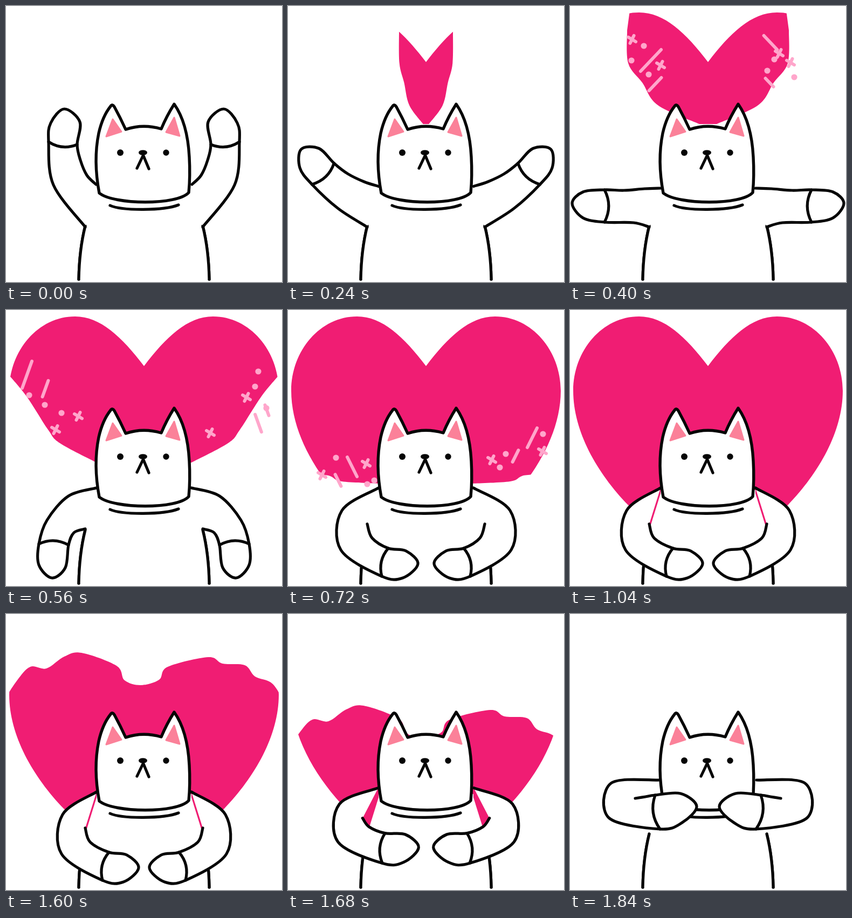
An HTML page with a canvas that plays this animation: 512x512 px, repeating every 1.92 s.

```html
<!DOCTYPE html>
<html lang="en">
<head>
<meta charset="utf-8">
<title>Cat drawing a heart</title>
<style>
html, body { margin: 0; width: 100%; height: 100%; overflow: hidden; background: #fff; }
canvas { display: block; width: 100vw; height: 100vh; }
</style>
</head>
<body>
<canvas id="stage" width="512" height="512"></canvas>
<script>
const ctx = document.getElementById('stage').getContext('2d');
const LOOP = 1920, STEP = 80;
const INK = '#050505', HEART = '#f01d73', SPARK = '#ffa6cb', EAR = '#fb8199';
const PIVOT = [160, 372];

// Left arm: shoulder, two arm points, cuff, three hand points, cuff, arm point, armpit.
const up = [167,331, 150,314, 138,286, 132,257, 137,215, 108,191, 83,217, 79,252, 88,332, 147,410];
const wide = [168,338, 138,339, 100,342, 64,341, 24,345, 4,366, 24,393, 64,401, 118,402, 147,410];
const down = [168,330, 116,345, 76,390, 61,434, 61,473, 85,497, 110,478, 116,436, 126,413, 147,406];
const hug = [168,330, 100,372, 98,445, 174,494, 213,497, 241,471, 219,447, 186,442, 156,423, 147,397];
const chin = [166,308, 76,314, 72,378, 167,399, 208,387, 235,357, 205,333, 158,336, 140,339, 121,342];
const rest = hug.map((v, i) => i % 2 || i < 2 || i > 15 ? v : v + 5);
const ARM_KEYS = [[80, up], [400, wide], [560, down], [720, hug], [880, rest], [1600, rest], [1840, chin]];

// Left border of the painted area, from the head outwards.
const edgeHigh = [240,219, 163,184, 134,142, 108,106, 106,45];
const edgeMid = [168,283, 100,247, 78,222, 38,160, 3,118];
const edgeLow = [170,322, 100,318, 78,308, 38,292, 0,200];
const EDGE_KEYS = [
  [160, edgeHigh.map((v, i) => i % 2 ? v : 256)],
  [400, edgeHigh], [560, edgeMid], [720, edgeLow],
  [880, edgeLow.map((v, i) => i % 2 ? v + 150 : v)]
];

const MELT = [-10,170, 20,124, 45,98, 75,101, 108,79, 140,72, 205,96, 220,123,
  250,132, 284,122, 300,98, 375,80, 402,92, 443,95, 462,116, 495,130, 522,175];

// Left then right: two crosses, three dots, two strokes.
const sparkHigh = [115,62, 168,110, 137,74, 114,101, 146,127, 150,101, 158,145,
  388,88, 409,105, 379,99, 366,120, 416,132, 372,68, 370,142];
const sparkMid = [134,197, 92,222, 72,176, 43,158, 103,191, 39,120, 73,146,
  446,162, 379,228, 468,114, 462,142, 483,182, 468,210, 484,186];
const sparkLow = [63,306, 145,285, 89,274, 147,323, 160,316, 119,291, 93,316,
  378,278, 472,262, 404,267, 473,230, 393,292, 453,237, 422,271];
const SPARK_KEYS = [[400, sparkHigh], [560, sparkMid], [720, sparkLow]];
const LEAN_KEYS = [[400, [-19, 20]], [560, [-9, 25]], [720, [9, 18]]];

const lerp = (a, b, k) => a + (b - a) * k;
const mixFlat = (a, b, k) => a.map((v, i) => lerp(v, b[i], k));

function polar(p, i) {
  const x = p[i] - PIVOT[0], y = p[i + 1] - PIVOT[1];
  return [Math.hypot(x, y), Math.atan2(y, x)];
}

function mixSwing(a, b, k) {
  const out = [];
  for (let i = 0; i < a.length; i += 2) {
    const [ra, ta] = polar(a, i), [rb, tb] = polar(b, i);
    const turn = Math.atan2(Math.sin(tb - ta), Math.cos(tb - ta));
    const r = lerp(ra, rb, k), th = ta + turn * k;
    out.push(PIVOT[0] + r * Math.cos(th), PIVOT[1] + r * Math.sin(th));
  }
  return out;
}

function sample(keys, t, mix) {
  if (t <= keys[0][0]) return keys[0][1];
  for (let i = 1; i < keys.length; i++) {
    const [t0, a] = keys[i - 1], [t1, b] = keys[i];
    if (t <= t1) return mix(a, b, (t - t0) / (t1 - t0));
  }
  return keys[keys.length - 1][1];
}

function spline(flat) {
  const n = flat.length / 2;
  const at = i => {
    const j = 2 * Math.max(0, Math.min(n - 1, i));
    return [flat[j], flat[j + 1]];
  };
  ctx.moveTo(...at(0));
  for (let i = 0; i < n - 1; i++) {
    const [p, a, b, q] = [at(i - 1), at(i), at(i + 1), at(i + 2)];
    ctx.bezierCurveTo(
      a[0] + (b[0] - p[0]) / 6, a[1] + (b[1] - p[1]) / 6,
      b[0] - (q[0] - a[0]) / 6, b[1] - (q[1] - a[1]) / 6, ...b);
  }
}

function eachSide(draw) {
  for (const flip of [false, true]) {
    ctx.save();
    if (flip) ctx.transform(-1, 0, 0, 1, 512, 0);
    draw();
    ctx.restore();
  }
}

function halfHeart() {
  ctx.fillStyle = HEART;
  ctx.beginPath();
  ctx.moveTo(257, 105);
  ctx.lineTo(256, 104);
  ctx.bezierCurveTo(215, 50, 175, 12, 128, 12);
  ctx.bezierCurveTo(60, 12, 6, 75, 6, 150);
  ctx.bezierCurveTo(6, 225, 50, 302, 108, 362);
  ctx.quadraticCurveTo(170, 420, 257, 470);
  ctx.fill();
}

function drawHeart(t) {
  if (t <= 160 || t >= 1840) return;
  ctx.save();
  if (t >= 1600) {
    const drop = (t - 1600) / STEP * 98;
    ctx.beginPath();
    spline(MELT.map((v, i) => i % 2 ? v + drop : v));
    ctx.lineTo(522, 512);
    ctx.lineTo(-10, 512);
    ctx.clip();
  }
  eachSide(() => {
    if (t < 880) {
      const edge = sample(EDGE_KEYS, t, mixFlat);
      ctx.beginPath();
      spline(edge);
      ctx.lineTo(edge[8] + 6, 0);
      ctx.lineTo(257, 0);
      ctx.lineTo(257, edge[1]);
      ctx.clip();
    }
    halfHeart();
  });
  ctx.restore();
}

function line(x, y, dx, dy) {
  ctx.beginPath();
  ctx.moveTo(x, y);
  ctx.lineTo(x + dx, y + dy);
  ctx.stroke();
}

function dot(x, y, rx, ry = rx) {
  ctx.beginPath();
  ctx.ellipse(x, y, rx, ry, 0, 0, 7);
  ctx.fill();
}

function drawSparks(t) {
  if (t < 320 || t >= 880) return;
  const marks = sample(SPARK_KEYS, t, mixFlat);
  const [leanX, leanY] = sample(LEAN_KEYS, t, mixFlat);
  const size = t > 720 ? 0.6 : 1;
  const spread = t < 400 ? 0.67 : 1;
  const drop = t > 720 ? 16 : 0;
  ctx.strokeStyle = ctx.fillStyle = SPARK;
  for (let i = 0; i < 14; i++) {
    const x = 256 + (marks[2 * i] - 256) * spread, y = marks[2 * i + 1] + drop;
    const kind = i % 7, side = i < 7 ? 1 : -1;
    ctx.lineWidth = 6 * size;
    if (kind < 2) {
      const r = 7 * size;
      line(x - r, y - r * 0.6, r * 2, r * 1.2);
      line(x + r * 0.5, y - r, -r, r * 2);
    } else if (kind < 5) {
      dot(x, y, 5.6 * size);
    } else {
      const k = size * (kind === 5 ? 1 : 0.6) * (side < 0 && t < 640 ? 0.65 : 1);
      const dx = leanX * side * k, dy = leanY * k;
      line(x - dx, y - dy, dx * 2, dy * 2);
    }
  }
}

function pen(width = 5.2) {
  ctx.strokeStyle = INK;
  ctx.lineWidth = width;
  ctx.fillStyle = '#fff';
}

function drawBody() {
  pen();
  ctx.fillRect(168, 334, 176, 173);
  eachSide(() => {
    ctx.beginPath();
    ctx.moveTo(147, 408);
    ctx.quadraticCurveTo(136, 452, 135, 507);
    ctx.stroke();
    ctx.lineTo(170, 507);
    ctx.lineTo(170, 334);
    ctx.fill();
  });
  eachSide(() => {
    ctx.beginPath();
    ctx.moveTo(147, 408);
    ctx.quadraticCurveTo(136, 452, 135, 507);
    ctx.stroke();
  });
  ctx.beginPath();
  ctx.moveTo(193, 370);
  ctx.bezierCurveTo(215, 380, 292, 380, 320, 369);
  ctx.stroke();
}

function drawArms(t) {
  const arm = sample(ARM_KEYS, t, t < 720 ? mixSwing : mixFlat);
  const [ax, ay] = arm.slice(6, 8), [bx, by] = arm.slice(14, 16);
  pen();
  eachSide(() => {
    ctx.beginPath();
    spline(arm);
    ctx.fill();
    ctx.stroke();
    ctx.beginPath();
    ctx.moveTo(ax, ay);
    ctx.quadraticCurveTo((ax + bx) / 2 + (by - ay) * 0.26, (ay + by) / 2 - (bx - ax) * 0.26, bx, by);
    ctx.stroke();
  });
}

function triangle(...p) {
  ctx.fillStyle = ctx.strokeStyle = EAR;
  ctx.lineWidth = 3;
  ctx.beginPath();
  for (let i = 0; i < 6; i += 2) ctx.lineTo(p[i], p[i + 1]);
  ctx.closePath();
  ctx.fill();
  ctx.stroke();
}

function drawHead() {
  pen(5.4);
  ctx.beginPath();
  ctx.moveTo(173, 347);
  ctx.bezierCurveTo(166, 310, 165, 270, 172, 236);
  ctx.bezierCurveTo(177, 214, 186, 196, 194, 186);
  ctx.quadraticCurveTo(197, 181, 201, 187);
  ctx.quadraticCurveTo(212, 207, 222, 229);
  ctx.quadraticCurveTo(254, 218, 288, 228);
  ctx.quadraticCurveTo(298, 204, 312, 182);
  ctx.bezierCurveTo(329, 206, 338, 242, 340, 280);
  ctx.quadraticCurveTo(342, 315, 339, 346);
  ctx.bezierCurveTo(318, 370, 200, 369, 173, 347);
  ctx.closePath();
  ctx.fill();
  ctx.stroke();
  triangle(198, 210, 186, 242, 214, 233);
  triangle(312, 207, 297, 234, 322, 241);

  pen();
  ctx.fillStyle = INK;
  dot(212, 272, 6);
  dot(297, 272, 5.7);
  dot(254, 272, 8, 4.8);
  line(254, 278, -11, 23);
  line(255, 278, 10, 24);
}

function render(now) {
  const t = Math.floor(now % LOOP / STEP) * STEP;
  ctx.fillStyle = '#fff';
  ctx.fillRect(0, 0, 512, 512);
  ctx.lineCap = ctx.lineJoin = 'round';
  drawHeart(t);
  drawSparks(t);
  drawBody();
  const layers = [() => drawArms(t), drawHead];
  if (t > 1600) layers.reverse();
  layers.forEach(draw => draw());
}

const start = performance.now();
function tick() {
  render(performance.now() - start);
  requestAnimationFrame(tick);
}
tick();
</script>
</body>
</html>
```
